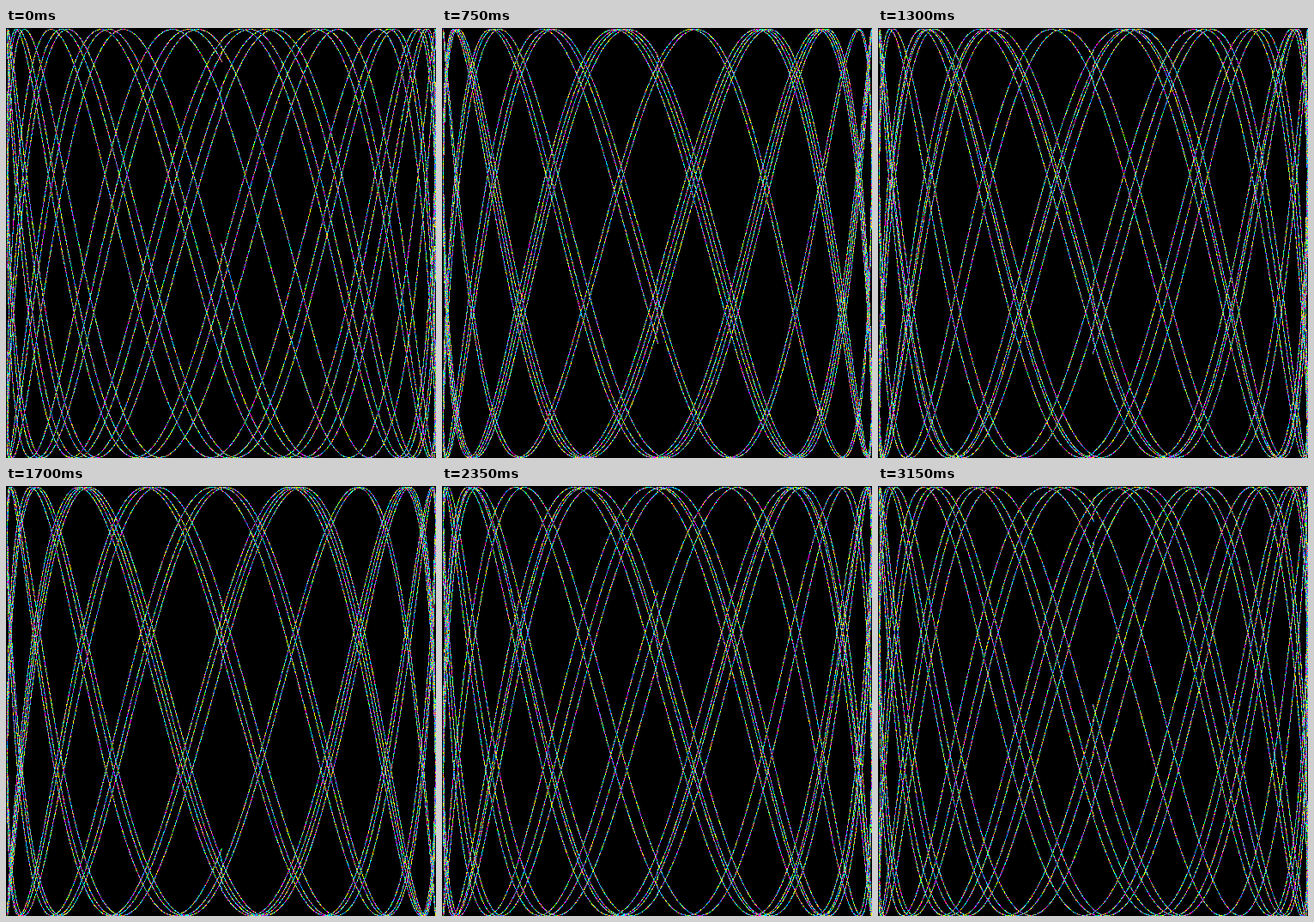
Animation, 501 px wide and 501 px high, one loop 3.2 s. Source, as an HTML page without scripts:

```html
<!DOCTYPE html>
<html lang="en">
<head>
<meta charset="utf-8">
<title>Lissajous</title>
<style>
@property --phase { syntax: "<number>"; inherits: true; initial-value: 0; }
@property --t { syntax: "<number>"; inherits: false; initial-value: 0; }
@property --q { syntax: "<number>"; inherits: false; initial-value: 0; }

html, body { margin: 0; height: 100%; overflow: hidden; background: #000; }
svg { display: block; width: 100vw; height: 100vh; isolation: isolate; }

/* x = sin t, y = sin(freq t + phase), eight turns of t */
.curve {
  --freq: 3.60479;
  animation: drift 3.2s steps(64) infinite;
}
@keyframes drift { from { --phase: 0; } to { --phase: 6.4; } }

/* Each arc is a parabola M + D u + E u², 64 arcs per turn */
.arc path {
  --t: calc((64 * var(--a) + 8 * var(--b) + var(--c) + .5) * pi / 32);
  --q: calc(var(--freq) * var(--t) + var(--phase));
  transform: matrix(
    calc(12.267 * cos(var(--t))), calc(44.007 * cos(var(--q))),
    calc(-.30113 * sin(var(--t))), calc(-3.9037 * sin(var(--q))),
    calc(250.5 + 250 * sin(var(--t)) + clamp(0, .5 - 10.2 * sin(var(--t)), 1)),
    calc(250.5 + 250 * sin(var(--q)) + clamp(0, .5 - 2.84 * sin(var(--q)), 1)));
  fill: none;
  stroke: #fff;
  stroke-width: 1.1px;
  stroke-linecap: square;
  vector-effect: non-scaling-stroke;
  shape-rendering: crispEdges;
}
.tint { mix-blend-mode: multiply; }
</style>
</head>
<body>
<svg viewBox="0 0 501 501">
  <defs>
    <filter id="speckle" filterUnits="userSpaceOnUse" x="0" y="0" width="501" height="501" color-interpolation-filters="sRGB">
      <feTurbulence type="fractalNoise" baseFrequency=".73" numOctaves="1" seed="5"/>
      <feColorMatrix values="1 0 0 0 0  0 1 0 0 0  0 0 1 0 0  0 0 0 0 1"/>
      <feComponentTransfer>
        <feFuncR type="discrete" tableValues="0 1"/>
        <feFuncG type="discrete" tableValues="0 1"/>
        <feFuncB type="discrete" tableValues="0 0 0 1 1 1 1"/>
      </feComponentTransfer>
      <feColorMatrix values="1 0 0 0 0  -.5 1 0 0 .5  -1 -1.3 1 0 1.3  0 0 0 0 1"/>
    </filter>
    <g id="arcs" class="arc">
      <path style="--c:0" d="M-1 1Q0-1 1 1"/>
      <path style="--c:1" d="M-1 1Q0-1 1 1"/>
      <path style="--c:2" d="M-1 1Q0-1 1 1"/>
      <path style="--c:3" d="M-1 1Q0-1 1 1"/>
      <path style="--c:4" d="M-1 1Q0-1 1 1"/>
      <path style="--c:5" d="M-1 1Q0-1 1 1"/>
      <path style="--c:6" d="M-1 1Q0-1 1 1"/>
      <path style="--c:7" d="M-1 1Q0-1 1 1"/>
    </g>
    <g id="turn">
      <use href="#arcs" style="--b:0"/>
      <use href="#arcs" style="--b:1"/>
      <use href="#arcs" style="--b:2"/>
      <use href="#arcs" style="--b:3"/>
      <use href="#arcs" style="--b:4"/>
      <use href="#arcs" style="--b:5"/>
      <use href="#arcs" style="--b:6"/>
      <use href="#arcs" style="--b:7"/>
    </g>
  </defs>
  <rect width="501" height="501"/>
  <g class="curve">
    <use href="#turn" style="--a:0"/>
    <use href="#turn" style="--a:1"/>
    <use href="#turn" style="--a:2"/>
    <use href="#turn" style="--a:3"/>
    <use href="#turn" style="--a:4"/>
    <use href="#turn" style="--a:5"/>
    <use href="#turn" style="--a:6"/>
    <use href="#turn" style="--a:7"/>
  </g>
  <rect class="tint" width="501" height="501" filter="url(#speckle)"/>
</svg>
</body>
</html>
```
